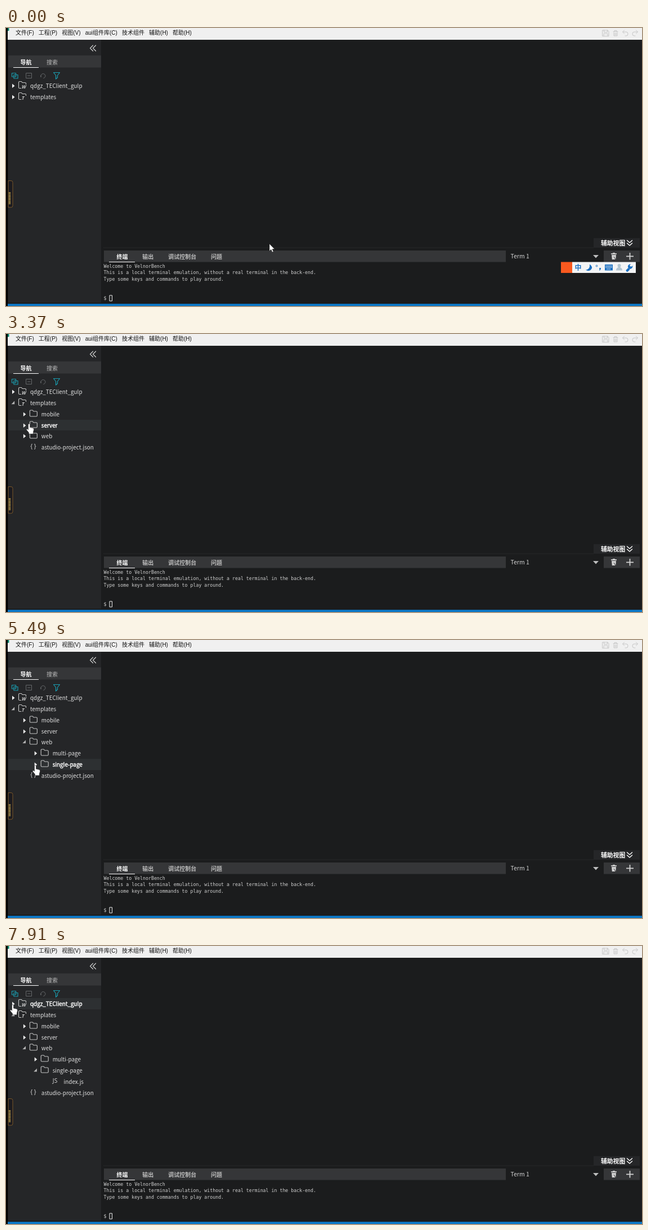
These frames come from a looping animation (1130x496 px, 8 s). An HTML page:

```html
<!DOCTYPE html>
<html lang="zh">
<head>
<meta charset="utf-8">
<title>IDE file tree</title>
<style>
html, body { margin: 0; width: 1130px; height: 496px; overflow: hidden; background: #1b1c1d; }
svg { display: block; position: absolute; overflow: visible; }
text { white-space: pre; }
#stage, #cursor { left: 0; top: 0; }
#cursor { pointer-events: none; }
.ui { font: 10px "Noto Sans CJK SC", "Noto Sans", sans-serif; fill: #bcbcbc; }
.menu { font: 10px "Liberation Sans", "Noto Sans CJK SC", sans-serif; fill: #111; word-spacing: 5.3px; }
.tabs { font-weight: bold; word-spacing: 23.6px; }
.mono { font: 8.25px "DejaVu Sans Mono", monospace; fill: #cfcfcf; }
.bold { font-weight: bold; }
.lit { fill: #fff; }
.line { fill: none; stroke-linecap: round; stroke-linejoin: round; }
#tree { position: absolute; left: 4px; top: 93px; width: 165px; }
.row { position: relative; height: 19.85px; }
.kids { overflow: hidden; }
.row text { font: 9.87px "Noto Sans CJK SC", "Noto Sans", sans-serif; fill: #e2e2e2; }
.row .tag { font: italic bold 8.5px "Noto Sans", sans-serif; fill: #c8c8c8; }
.row .icon { font: 500 10.3px "Noto Sans", sans-serif; fill: #d0d0d0; }
.row.hover { background: #2d3032; }
.row.hover .name { fill: #fff; stroke: #fff; stroke-width: .4; }
</style>
</head>
<body>
<svg id="stage" width="1130" height="496">
  <path fill="#000" d="M0 0h3v496H0z"/>
  <path fill="#f0f0f0" d="M3 0h1127v21H3z"/>
  <path fill="#0b8a6c" d="M3 0h2.5v5H3z"/>
  <path fill="#252628" d="M4 21h165v469H4zM1044 375h82v17h-82z"/>
  <path fill="#353638" d="M4 49h165v21.5H4zM174 397h714v20.5H174zM1062 397h64v20.5h-64z"/>
  <path fill="#29292b" d="M173 391.5h871v1H173z"/>
  <path fill="#fff" d="M13 70h45v1H13zM183 417h46v1h-46z"/>
  <path fill="#0c76c4" d="M3 492h1127v4H3z"/>
  <text class="menu" x="17" y="12">文件(F) 工程(P) 视图(V) aui组件库(C) 技术组件 辅助(H) 帮助(H)</text>
  <g class="line" stroke="#c6c6c6">
    <path d="M1060 4h9l2 2v8.5h-11zM1062.5 4v3.5h6V4M1062 14v-4h7v4"/>
    <path d="M1079 6.5h8M1081 6V4.5h4V6M1080 8v6h6V8M1082 9v3.5M1084 9v3.5"/>
    <path d="M1098.500 4l-3 3 3 3M1096 7h6q3 0 3 3.500t-3 3.500h-2M1119.500 4l3 3-3 3M1122 7h-6q-3 0-3 3.500t3 3.500h2"/>
  </g>
  <path class="line" stroke="#d0d0d0" stroke-width="1.2" d="M154.5 31l-5 5 5 5M159.5 31l-5 5 5 5"/>
  <g class="line" stroke="#1a9db0" stroke-width="1.2">
    <path d="M10.5 80.5h7v6.5h-7zM14 83.5h7v6.5h-7z"/>
    <path d="M84.5 79.5h11l-4 5v4l-3 2.5v-6.5z"/>
  </g>
  <path class="line" stroke="#66696b" d="M36 80.5h9.500v9H36zM38.500 85h4.500M62.200 87a4 4 0 1 1 4.500 2.500M62 87.500l-.5-2.500"/>
  <g class="ui">
    <text class="bold lit" x="25.5" y="65">导航</text>
    <text x="72" y="65">搜索</text>
    <text class="tabs" x="196.5" y="411.7"><tspan class="lit">终端</tspan> 输出 调试控制台 问题</text>
    <text class="bold lit" x="1057" y="388" style="font-size:10.8px">辅助视图</text>
    <text x="896.5" y="410.7" style="font-size:10.5px;fill:#cfcfcf">Term 1</text>
  </g>
  <path class="line" stroke="#fff" stroke-width="1.5" d="M1103.5 379l4.5 4 4.5-4M1103.5 384l4.5 4 4.5-4"/>
  <path fill="#bdbdbd" d="M1043 405h10l-5 5.5z"/>
  <path fill="#d2d2d2" d="M1075 402h10v1.8h-10zM1078 401h4v1h-4zM1076 404.8h8l-.8 8.2h-6.4zM1102 406.5h13v1.8h-13zM1107.6 401h1.8v12.5h-1.8z"/>
  <path stroke="#353638" d="M1080 408l3 5"/>
  <g class="mono">
    <text x="173.5" y="427.5">Welcome to VelnorBench</text>
    <text x="173.5" y="439">This is a local terminal emulation, without a real terminal in the back-end.</text>
    <text x="173.5" y="450.6">Type some keys and commands to play around.</text>
    <text x="173.5" y="485.3">$</text>
  </g>
  <path fill="none" stroke="#eee" d="M184 477h4.5v10H184z"/>
  <path fill="#1c1b20" stroke="#7a5628" d="M4 272.5h5q3 0 3 3v41.5q0 3-3 3H4z"/>
  <path stroke="#b39a4a" stroke-width="3.5" stroke-dasharray="1.4 .8" d="M6.5 293v22"/>
  <g id="ime">
    <path fill="#f3f4f5" d="M1006 417.5h113V437h-113z"/>
    <path fill="#f8591f" d="M986 417.5h20V437h-20z"/>
    <text class="ui bold" x="1010.5" y="431.7" style="font-size:12px;fill:#1b70c2">中</text>
    <g fill="#1b70c2">
      <path d="M1037 421.5q7 5 2 10-4 3.5-9 0 8-1 7-10z"/>
      <path d="M1054 428h3q0 4-3 5l.5-2zM1105.5 428l3 3-4 4q-3 0-3-3zM1105 427q-1-5 5-6l-2 3 2.5 2 3-2q0 6-6 6z"/>
      <path d="M1064 422h14v10.5h-14z"/>
    </g>
    <circle cx="1049.5" cy="424.5" r="1.4" fill="none" stroke="#1b70c2"/>
    <path stroke="#f3f4f5" stroke-width="1.3" stroke-dasharray="1.4 1" d="M1065.5 424.5h11M1065.5 427h11M1067.5 430h7"/>
    <path fill="#b3c6d2" d="M1086.5 424a3 3 0 1 1 6 0q0 2-1.5 3 4 1 4 5.5h-11q0-4.5 4-5.5-1.5-1-1.5-3z"/>
  </g>
</svg>
<div id="tree"></div>
<svg id="cursor" width="1" height="1">
  <path id="arrow" fill="#fff" stroke="#111" stroke-width=".5" d="M0 0V13l3-2.7 2 4.7 2.2-.9-2-4.5h4z"/>
  <path id="hand" fill="#fff" stroke="#222" stroke-width=".6" d="M-1.5 1.5Q0-.3 1.5 1.5V7l5.5 1.3Q8.8 8.9 8.5 11.5L7.3 16V18.8H-.5V16.5L-4.6 11.5Q-5 9.300-3 9.700L-1.500 11.300z"/>
</svg>
<script>
const LOOP = 8000, TICKS = 60, PITCH = 19.85;
const $ = id => document.getElementById(id);

// opens: first and last tick of the slide
const tree = [
  { name: 'qdgz_TEClient_gulp', tag: 'W' },
  { name: 'templates', tag: 'T', opens: [19, 22], kids: [
    { name: 'mobile' },
    { name: 'server' },
    { name: 'web', opens: [32, 34], kids: [
      { name: 'multi-page' },
      { name: 'single-page', opens: [42, 45], kids: [{ name: 'index.js', icon: 'JS' }] }] },
    { name: 'astudio-project.json', icon: '{ }' }] }];

// turning points of the pointer: [tick, x, y]
const path = [
  [0, 468, 385], [3, 468, 385], [6, 354, 276], [8, 278, 211], [9, 181, 162], [11, 62, 137],
  [14, 16, 125], [22, 16, 125], [24, 41, 151], [28, 41, 185], [30, 34, 183], [34, 34, 183],
  [40, 52, 223], [45, 52, 223], [48, 108, 249], [51, 108, 249], [53, 100, 228],
  [55, 50, 146], [59, 12, 104]];

const CLOSED = 'M11 6.5l4.5 3.7-4.5 3.7z', OPEN = 'M15.2 6.5v5.8H9.5z';
const FOLDER = 'M22.5 12.5v-8q0-1.5 1.5-1.5h3.5l1.5 2h5q1.5 0 1.5 1.5v6q0 1.5-1.5 1.5h-10q-1.5 0-1.5-1.5z';
const TAGGED = 'M27 14.5h-3q-1.5 0-1.5-1.5V4q0-1.5 1.5-1.5h3.5l1.5 2h5q1.5 0 1.5 1.5v1.5';

function build(nodes, parent, depth) {
  for (const node of nodes) {
    const { name, tag, icon, kids } = node;
    const row = document.createElement('div');
    row.className = 'row';
    const art = icon
      ? `<text class="icon" x="23.3" y="11.7">${icon}</text>`
      : `<path class="twist" fill="#f2f2f2" d="${CLOSED}"/>
         <path class="line" stroke="#c8c8c8" stroke-width="1.1" d="${tag ? TAGGED : FOLDER}"/>
         <text class="tag" x="28" y="15">${tag ?? ''}</text>`;
    row.innerHTML = `<svg width="165" height="20" viewBox="4 0 165 20">
      <g transform="translate(${depth * PITCH})">${art}<text class="name" x="43" y="13.7">${name}</text></g></svg>`;
    parent.append(row);
    if (!kids) continue;
    node.twist = row.querySelector('.twist');
    node.box = document.createElement('div');
    node.box.className = 'kids';
    parent.append(node.box);
    build(kids, node.box, depth + 1);
  }
}
build(tree, $('tree'), 0);

const progress = (a, b, v) => Math.min(1, Math.max(0, (v - a) / (b - a)));

function pointer(tick) {
  const next = path.findIndex(p => p[0] > tick);
  if (next < 0) return path.at(-1).slice(1);
  const [a, ...from] = path[next - 1], [b, ...to] = path[next];
  return from.map((v, i) => v + (to[i] - v) * progress(a, b, tick));
}

// sets the height of every opening folder and returns the total
function layout(nodes, tick) {
  let total = 0;
  for (const { kids, opens, box, twist } of nodes) {
    total += PITCH;
    if (!kids) continue;
    const open = progress(...opens, tick) ** .85, height = open * layout(kids, tick);
    box.style.height = height + 'px';
    twist.setAttribute('d', open ? OPEN : CLOSED);
    twist.setAttribute('fill', open ? '#b4b4b4' : '#f2f2f2');
    total += height;
  }
  return total;
}

const rows = document.querySelectorAll('.row');
const show = (id, on) => $(id).style.display = on ? '' : 'none';

function draw(now) {
  const tick = Math.floor(now % LOOP * TICKS / LOOP), [x, y] = pointer(tick);
  layout(tree, tick);
  const hit = document.elementFromPoint(x, y)?.closest('.row');
  rows.forEach(row => row.classList.toggle('hover', row === hit));
  show('hand', hit);
  show('arrow', !hit);
  show('ime', tick < 20);
  $('cursor').style.transform = `translate(${x}px, ${y}px)`;
}

const start = performance.now();
requestAnimationFrame(function loop(now) {
  draw(Math.max(0, now - start));
  requestAnimationFrame(loop);
});
</script>
</body>
</html>
```
